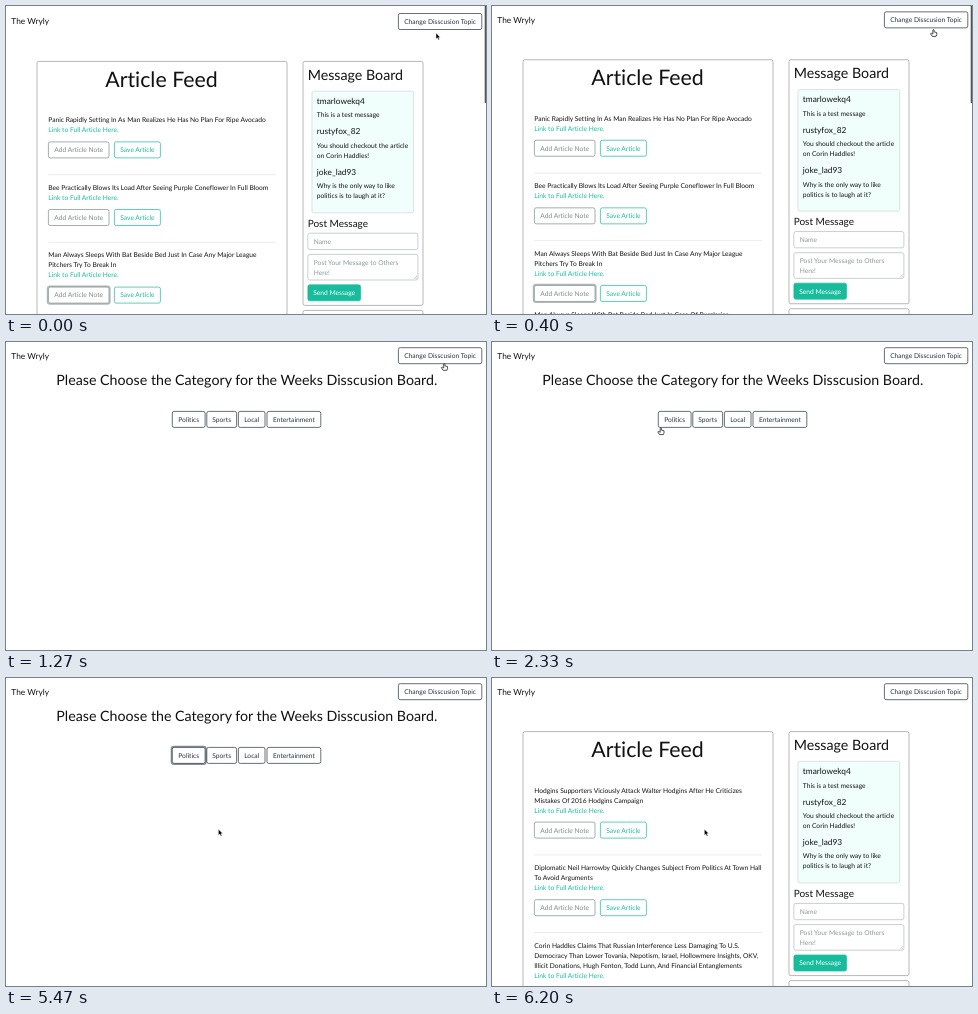
Write an HTML page that moves like this. It is 480x308 px and loops after 6990 ms.

```html
<!DOCTYPE html>
<html lang="en">
<head>
<meta charset="utf-8">
<title>Article feed</title>
<style>
html, body { margin: 0; height: 100%; overflow: hidden; background: #fff; }
svg { display: block; width: 100vw; height: 100vh; }
text { font-family: Lato, sans-serif; font-variant-ligatures: none; text-rendering: geometricPrecision; white-space: pre; }
</style>
</head>
<body>
<svg id="stage" viewBox="0 0 480 308"></svg>
<script>
const INK = '#111', NAVY = '#243240', GREY = '#8b9a9b', GREEN = '#18bc9c';
const LOOP = 6990, STEPS = 105;
const BODY = 6.667, H1 = BODY * 3.2, H3 = H1 / 1.5, H4 = BODY * 1.5, H5 = BODY * 1.25;

const text = (x, y, str, size = BODY, fill = INK, anchor = 'start') =>
  `<text x="${x}" y="${y}" font-size="${size}" fill="${fill}" text-anchor="${anchor}">${str}</text>`;
const box = (x, y, w, h, stroke, fill = 'none', sw = 0.7, r = 1.8) =>
  `<rect x="${x}" y="${y}" width="${w}" height="${h}" rx="${r}" fill="${fill}" stroke="${stroke}" stroke-width="${sw}"/>`;
const group = (id, body) => `<g id="${id}">${body}</g>`;

// Outlined button centred vertically on cy; a filled one when solid is set
function button(x, cy, w, label, color, solid) {
  return box(x, cy - 8, w, 16, color, solid ? color : '#fff') +
    text(x + w / 2, cy + 2.4, label, BODY, solid ? '#fff' : color, 'middle');
}
const ring = (x, cy, w, color) =>
  `<g opacity=".55">${box(x - 0.9, cy - 8.9, w + 1.8, 17.8, color, 'none', 1.4, 2.6)}</g>`;

function articles(list) {
  let y = 114.5;
  return list.map(lines => {
    const link = y + lines.length * 10, cy = link + 17.6;
    const out = lines.map((s, i) => text(42.3, y + i * 10, s)).join('') +
      text(42.3, link, 'Link to Full Article Here.', BODY, GREEN) +
      button(42.4, cy, 60.6, 'Add Article Note', '#7f8b8c') +
      button(108.4, cy, 46, 'Save Article', GREEN) +
      `<path d="M42.3 ${cy + 24.8}H270" stroke="#ddd" stroke-width=".6"/>`;
    y = link + 57.6;
    return out;
  }).join('');
}

const messages = [
  [96.2, 'tmarlowekq4', 'This is a test message'],
  [126.6, 'rustyfox_82', 'You should checkout the article', 'on Corin Haddles!'],
  [167, 'joke_lad93', 'Why is the only way to like', 'politics is to laugh at it?']
].map(([y, user, ...lines]) => text(310.8, y, user, H5) +
  lines.map((s, i) => text(310.8, y + 13.4 + i * 10, s)).join('')).join('');

const board =
  box(31, 53.6, 250, 300, '#999') + box(297, 53.6, 120, 244, '#999') + box(297, 302.6, 120, 60, '#999') +
  text(155.5, 78.8, 'Article Feed', H1, INK, 'middle') +
  text(301.7, 72.3, 'Message Board', H3) +
  box(306, 83.4, 101.6, 121.6, '#c9dcd8', '#f0fffb') + messages +
  text(301.7, 219.3, 'Post Message', H4) +
  box(301.9, 225.4, 110, 16.3, '#b4bbc1') + text(307.8, 236, 'Name', BODY, GREY) +
  box(301.9, 246.6, 110, 25.6, '#b4bbc1') +
  text(307.8, 257, 'Post Your Message to Others', BODY, GREY) + text(307.8, 267, 'Here!', BODY, GREY) +
  '<path d="M408 271.2l3-3M409.8 271.2l1.2-1.2" stroke="#888" stroke-width=".4"/>' +
  button(301.9, 285, 52.6, 'Send Message', GREEN, true);

const firstFeed = articles([
  ['Panic Rapidly Setting In As Man Realizes He Has No Plan For Ripe Avocado'],
  ['Bee Practically Blows Its Load After Seeing Purple Coneflower In Full Bloom'],
  ['Man Always Sleeps With Bat Beside Bed Just In Case Any Major League', 'Pitchers Try To Break In']
]) + text(42.3, 311, 'Man Always Sleeps With Bat Beside Bed Just In Case Of Burglaries');

const politicsFeed = articles([
  ['Hodgins Supporters Viciously Attack Walter Hodgins After He Criticizes', 'Mistakes Of 2016 Hodgins Campaign'],
  ['Diplomatic Neil Harrowby Quickly Changes Subject From Politics At Town Hall', 'To Avoid Arguments'],
  ['Corin Haddles Claims That Russian Interference Less Damaging To U.S.',
   'Democracy Than Lower Tovania, Nepotism, Israel, Hollowmere Insights, OKV,',
   'Illicit Donations, Hugh Fenton, Todd Lunn, And Financial Entanglements']
]);

const choices = text(240.8, 42.9, 'Please Choose the Category for the Weeks Disscusion Board.', H3, INK, 'middle') +
  [[166.3, 32.8, 'Politics'], [200.8, 29.8, 'Sports'], [232.4, 26.6, 'Local'], [261, 53.8, 'Entertainment']]
    .map(([x, w, s]) => button(x, 77.4, w, s, NAVY)).join('') +
  group('pickHover', button(166.3, 77.4, 32.8, 'Politics', NAVY, true)) +
  group('pickRing', ring(166.3, 77.4, 32.8, NAVY));

const topic = solid => button(392.4, 13.7, 83.4, 'Change Disscusion Topic', NAVY, solid);

stage.innerHTML = group('page',
    text(5.3, 16.5, 'The Wryly', H5) + topic() +
    group('navHover', topic(true)) + group('navRing', ring(392.4, 13.7, 83.4, NAVY)) +
    group('boardView', board) +
    group('firstView', firstFeed + group('noteRing', ring(42.4, 287.3, 60.6, '#6f8082'))) +
    group('politicsView', politicsFeed) + group('choiceView', choices)) +
  group('scrollbar', '<rect x="478.7" y="0" width="1.3" height="97" fill="#555"/>') +
  group('arrow', '<path d="M0 0V6L1.4 4.8L2.4 7L3.4 6.6L2.5 4.4H4.3Z" fill="#000" stroke="#fff" stroke-width=".4"/>') +
  group('hand', '<path d="M-.6 .6Q0-.3 .6 .6V2.5L3.2 3.2Q3.6 5.5 2.6 7H-1.2L-3 4.4Q-2.6 3.4-1.6 4L-.6 4.7Z" fill="#fff" stroke="#222" stroke-width=".8"/>');

const $ = id => document.getElementById(id);
const ramp = (k, a, b) => Math.min(1, Math.max(0, (k - a) / (b - a)));
const fade = (id, v) => $(id).setAttribute('opacity', v);
const show = (id, on) => $(id).setAttribute('display', on ? 'inline' : 'none');
const move = (id, x, y) => $(id).setAttribute('transform', `translate(${x} ${y})`);

// Pointer path: step, x, y
const path = [[0, 430, 27], [3, 443, 26], [7, 441, 22.5], [11, 438.3, 21.3], [24, 438.3, 21.3],
  [25, 375, 36], [26, 255, 68], [27, 175, 86], [28, 150, 89], [32, 150, 89], [35, 168.8, 85.6],
  [38, 175, 83], [41, 176, 82], [50, 176, 82], [52, 196, 122], [54, 212.4, 151.2], [STEPS, 212.4, 151.2]];

function pointer(k) {
  const i = Math.max(1, path.findIndex(p => p[0] >= k));
  const [a, ax, ay] = path[i - 1], [b, bx, by] = path[i], u = ramp(k, a, b);
  return [ax + (bx - ax) * u, ay + (by - ay) * u];
}

function draw(now) {
  const k = Math.floor((now % LOOP) / LOOP * STEPS);
  const choosing = k >= 19 && k < 90, hand = (k >= 6 && k < 25) || (k >= 35 && k < 51);
  move('page', 0, k < 12 ? 1.8 * Math.exp(-k / 2.4) : 0);
  show('boardView', !choosing);
  show('firstView', k < 19);
  show('politicsView', k >= 90);
  show('choiceView', choosing);
  fade('scrollbar', 1 - ramp(k, 6, 10));
  fade('noteRing', 1 - ramp(k, 12, 15));
  fade('navHover', k < 19 ? ramp(k, 6, 9) : 0);
  fade('navRing', k < 19 ? ramp(k, 12, 15) : 0);
  fade('pickHover', ramp(k, 35, 38) - ramp(k, 51, 54));
  fade('pickRing', ramp(k, 38, 41));
  show('hand', hand);
  show('arrow', !hand);
  move(hand ? 'hand' : 'arrow', ...pointer(k));
  requestAnimationFrame(draw);
}
draw(0);
</script>
</body>
</html>
```
